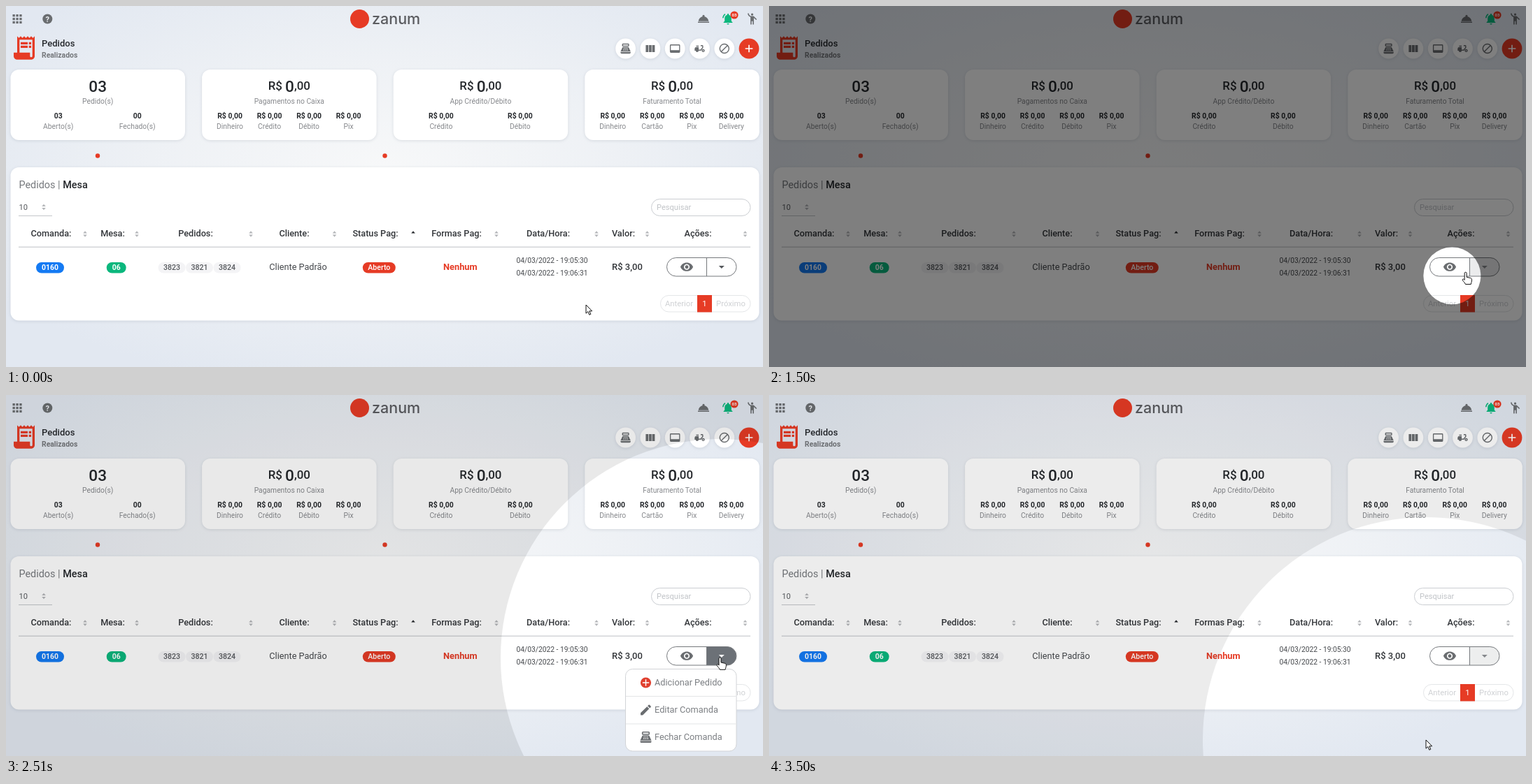
Write an HTML page that moves like this. It is 1082 px wide and 517 px high and loops after 3570 ms.

```html
<!DOCTYPE html>
<html lang="pt-BR">
<head>
<meta charset="utf-8">
<title>Pedidos</title>
<style>
  html, body { margin: 0; width: 100%; height: 100%; overflow: hidden; background: #e4e9f1; }
  svg { display: block; width: 100%; height: 100%; font-family: Roboto, sans-serif; }
  .card { fill: #fff; filter: drop-shadow(0 1px 2px rgba(60, 70, 90, .14)); }
</style>
</head>
<body>
<svg id="stage" viewBox="0 0 1082 517" xmlns="http://www.w3.org/2000/svg"></svg>
<script>
const RED = '#e63b25', GREEN = '#0bb77d', GRAY = '#6a6d70', SOFT = '#86888c', INK = '#25282c';

const ICONS = {
  receipt: 'M19.5 3.5 18 2l-1.5 1.5L15 2l-1.5 1.5L12 2l-1.5 1.5L9 2 7.5 3.5 6 2v14H3v3c0 1.7 1.3 3 3 3h12c1.7 0 3-1.3 3-3V2zM19 19c0 1.3-2 1.3-2 0v-3H8V5h11zM9 7h6v2H9zM16 7h2v2h-2zM9 10h6v2H9zM16 10h2v2h-2z',
  cloche: 'M2 17h20v2H2zM13.8 7.8a2 2 0 1 0-3.6 0C6.3 8.6 3.3 11.9 3 16h18c-.3-4.1-3.3-7.4-7.2-8.2z',
  bell: 'M7.6 4.1 6.2 2.7C3.8 4.5 2.2 7.3 2 10.5h2c.2-2.6 1.5-5 3.6-6.4zM20 10.5h2c-.2-3.2-1.7-6-4.1-7.8l-1.5 1.4c2.1 1.4 3.4 3.8 3.6 6.4zM18 11c0-3.1-1.6-5.6-4.5-6.3V4a1.5 1.5 0 0 0-3 0v.7C7.6 5.4 6 7.9 6 11v5l-2 2v1h16v-1l-2-2zM12 22a2 2 0 0 0 2-2h-4a2 2 0 0 0 2 2z',
  person: 'M12 2a2 2 0 1 0 .01 0zM15.9 8.1C15.5 7.7 14.8 7 13.5 7H11C8.2 7 6 4.8 6 2H4c0 3.2 2.1 5.8 5 6.7V22h2v-6h2v6h2V10l4 4 1.4-1.4z',
  register: 'M7 2h10a2 2 0 0 1 2 2v2a2 2 0 0 1-2 2H7a2 2 0 0 1-2-2V4a2 2 0 0 1 2-2zM7 4v2h10V4zM7.3 9h9.4a2 2 0 0 1 1.8 1.2L22 18H2l3.500-7.800A2 2 0 0 1 7.300 9zM2 19h20v1a2 2 0 0 1-2 2H4a2 2 0 0 1-2-2zM8 11h2v1.200H8zM11 11h2v1.200h-2zM14 11h2v1.200h-2zM7.500 14h2.200v1.300H7.500zM11 14h2v1.300h-2zM14.300 14h2.200v1.300h-2.200z',
  columns: 'M3 5h5.300v14H3zM9.400 5h5.200v14H9.400zM15.700 5H21v14h-5.300z',
  tray: 'M3 3h18a2 2 0 0 1 2 2v14a2 2 0 0 1-2 2H3a2 2 0 0 1-2-2V5a2 2 0 0 1 2-2zM3 5v10.500h18V5z',
  moped: 'M19 7a2 2 0 0 0-2-2h-3v2h3v2.600L13.500 14H10V9H6a4 4 0 0 0-4 4v3h2a3 3 0 0 0 6 0h4.500l4.500-5.600zM5 6h5v2H5zM19 13a3 3 0 1 0 .01 0zM19 15a1 1 0 1 1-.01 0z',
  block: 'M12 2a10 10 0 1 0 .01 0zM12 4a8 8 0 0 1 4.900 1.700L5.700 16.900A8 8 0 0 1 12 4zM12 20a8 8 0 0 1-4.900-1.700L18.300 7.100A8 8 0 0 1 12 20z',
  plus: 'M11 5.500h2V11h5.500v2H13v5.500h-2V13H5.500v-2H11z',
  eye: 'M12 4.500C7 4.500 2.700 7.600 1 12c1.700 4.400 6 7.500 11 7.500s9.300-3.100 11-7.500c-1.700-4.400-6-7.500-11-7.500zM12 7a5 5 0 1 1-.01 0zM12 9a3 3 0 1 0 .01 0z',
  pencil: 'M3 17.200V21h3.800L17.800 9.900l-3.700-3.700zM20.700 7a1 1 0 0 0 0-1.400l-2.300-2.300a1 1 0 0 0-1.400 0l-1.900 1.800 3.800 3.800z'
};

const text = (x, y, s, size, fill = INK, weight = 400, anchor = 'middle') =>
  `<text x="${x}" y="${y}" font-size="${size}" fill="${fill}" font-weight="${weight}" text-anchor="${anchor}">${s}</text>`;
const rect = (x, y, w, h, r, attrs) =>
  `<rect x="${x}" y="${y}" width="${w}" height="${h}" rx="${r}" ${attrs}/>`;
const dot = (x, y, r, fill) => `<circle cx="${x}" cy="${y}" r="${r}" fill="${fill}"/>`;
const line = (x1, x2, y, color, w = 1) => `<path d="M${x1} ${y}H${x2}" stroke="${color}" stroke-width="${w}"/>`;
const icon = (name, x, y, scale, fill = GRAY) =>
  `<path d="${ICONS[name]}" fill="${fill}" fill-rule="evenodd" transform="translate(${x} ${y}) scale(${scale}) translate(-12 -12)"/>`;
const sorter = (x, y, active) =>
  `<path d="M${x - 2.8} ${y - 1}l2.800-3.300 2.800 3.300z" fill="${active ? INK : '#b4b6b9'}"/>` +
  (active ? '' : `<path d="M${x - 2.8} ${y + 1}l2.800 3.300 2.800-3.300z" fill="#b4b6b9"/>`);
const badge = (x, w, s, fill, color = '#fff', size = 10.4, weight = 700) =>
  rect(x - w / 2, 367, w, 15.5, 7.7, `fill="${fill}"`) + text(x, 378.4, s, size, color, weight);

function topBar() {
  let out = '';
  for (let i = 0; i < 9; i++)
    out += rect(9.5 + i % 3 * 4.9, 12 + Math.floor(i / 3) * 4.9, 3.3, 3.3, 0, `fill="${GRAY}"`);
  out += dot(59.3, 18.5, 7, GRAY) + text(59.3, 22.6, '?', 11, '#eef1f5', 700);
  out += dot(505.5, 18.5, 13.5, RED);
  out += `<text x="523" y="26" font-size="21.5" font-weight="500" fill="#5b5c60" style="font-family:Inter,sans-serif">zanum</text>`;
  out += icon('cloche', 997, 18.5, .8) + icon('bell', 1032, 18.5, .8, GREEN) + icon('person', 1066.5, 18.5, .8);
  out += dot(1041, 13, 5.6, RED) + text(1041, 15.2, '03', 6, '#fff', 700);
  out += icon('receipt', 26, 60, 1.667, RED);
  out += text(51, 57.5, 'Pedidos', 13, INK, 500, 'start') + text(51, 73.5, 'Realizados', 10.4, '#74777b', 700, 'start');
  ['register', 'columns', 'tray', 'moped', 'block'].forEach((name, i) => {
    const x = 885.6 + i * 35.3;
    out += `<circle class="card" cx="${x}" cy="61" r="14.4"/>` + icon(name, x, 61, name === 'tray' ? .66 : .72);
  });
  return out + dot(1062, 61, 14.4, RED) + icon('plus', 1062, 61, .82, '#fff');
}

function summary() {
  const money = 'R$ 0,00';
  const cards = [
    ['Pedido(s)', ['Aberto(s)', 'Fechado(s)'], ['03', '00']],
    ['Pagamentos no Caixa', ['Dinheiro', 'Crédito', 'Débito', 'Pix']],
    ['App Crédito/Débito', ['Crédito', 'Débito']],
    ['Faturamento Total', ['Dinheiro', 'Cartão', 'Pix', 'Delivery']]
  ];
  return cards.map(([title, labels, counts], i) => {
    const x = 6.5 + i * 273.6, mid = x + 124.7, step = 226 / labels.length;
    const head = counts ? text(mid, 123, '03', 22.6, INK, 500)
      : text(mid, 119.8, 'R$ <tspan font-size="22.6" dy="3">0</tspan><tspan dy="-3">,00</tspan>', 16.9, INK, 500);
    return rect(x, 91, 249.5, 101, 12, 'class="card"') + head + text(mid, 140, title, 10.3, SOFT) +
      labels.map((label, k) => {
        const cx = mid + (k - (labels.length - 1) / 2) * step;
        return text(cx, 161, counts ? counts[k] : money, 10.4, INK, 700) + text(cx, 176, label, 10.3, SOFT);
      }).join('');
  }).join('') + dot(131, 214.5, 3.2, RED) + dot(541.5, 214.5, 3.2, RED);
}

function table() {
  const columns = [
    ['Comanda:', 64.5, 113], ['Mesa:', 152.5, 187], ['Pedidos:', 271, 350], ['Cliente:', 412, 469.5],
    ['Status Pag:', 528, 582], ['Formas Pag:', 644, 701], ['Data/Hora:', 775, 844], ['Valor:', 882.5, 916.5], ['Ações:', 989, 1056.5]
  ];
  let out = rect(6.5, 231, 1070, 219.5, 12, 'class="card"');
  out += text(18.5, 261, `Pedidos | <tspan fill="${INK}" font-weight="500">Mesa</tspan>`, 14.4, '#75787c', 400, 'start');
  out += text(18.5, 292, '10', 11.1, '#55585c', 400, 'start') + sorter(54, 288) + line(18, 66, 300.5, '#c4c7ca');
  out += rect(922.5, 276.5, 141.5, 24, 12, 'fill="#fff" stroke="#cbced2"') + text(930, 292, 'Pesquisar', 11.1, '#c0c3c7', 400, 'start');
  for (const [name, x, sx] of columns)
    out += text(x, 329.6, name, 12.7, '#33363a', 500) + sorter(sx, 326.5, name === 'Status Pag:');
  out += line(18, 1064, 345.3, '#d3d5d8', 1.5);
  out += badge(63, 40, '0160', '#147af3') + badge(157.7, 28, '06', GREEN) + badge(533.3, 47, 'Aberto', RED, '#fff', 10.6, 500);
  [237, 276.5, 316].forEach((x, i) => out += badge(x, 39, [3823, 3821, 3824][i], '#f4f4f6', '#55585c', 10.6, 500));
  out += text(417.5, 378, 'Cliente Padrão', 12.7, '#45484c') + text(649.3, 378, 'Nenhum', 12.8, RED, 700);
  out += text(780.5, 367.7, '04/03/2022 - 19:05:30', 10.25, '#45484c') + text(780.5, 386, '04/03/2022 - 19:06:31', 10.25, '#45484c');
  out += text(888, 378, 'R$ 3,00', 13, '#33363a', 500);
  out += '<path id="toggle" d="M1001.500 360.500h29a13.200 13.200 0 0 1 0 26.500h-29z" fill="#6c7177"/>';
  out += rect(944.5, 360.5, 99.5, 26.5, 13.2, 'fill="none" stroke="#75787c"') + '<path d="M1001.500 360.500v26.500" stroke="#75787c"/>';
  out += icon('eye', 973, 373.7, .82) + '<path id="caret" d="M1018.800 372h8l-4 4z"/>';
  out += rect(935.5, 414.5, 128.5, 23.5, 11.7, 'fill="#fff" stroke="#e4e6e8"') + rect(988, 414, 21, 24.5, 0, `fill="${RED}"`);
  return out + text(962, 430, 'Anterior', 11.3, '#cfd1d4') + text(998.5, 430, '1', 11.3, '#fff') + text(1036, 430, 'Próximo', 11.3, '#cfd1d4');
}

function menu() {
  let out = rect(885.5, 392.5, 158.5, 117.5, 10, 'fill="#fff" stroke="#d2d4d7"');
  out += line(886, 1043.5, 431.5, '#e3e5e7') + line(886, 1043.5, 471, '#e3e5e7');
  ['Adicionar Pedido', 'Editar Comanda', 'Fechar Comanda'].forEach((s, i) =>
    out += text(927, 415.5 + i * 39.2, s, 12.75, '#7c7f83', 400, 'start'));
  out += dot(914.5, 412, 7.6, '#e0402f') + icon('plus', 914.5, 412, .72, '#fff');
  return out + icon('pencil', 914.5, 451, .83) + icon('register', 914.5, 490, .8);
}

const stage = document.getElementById('stage');
stage.innerHTML = `
  <defs><radialGradient id="sky" cx=".5" cy=".45" r=".62">
    <stop stop-color="#f7f8f9"/><stop offset=".5" stop-color="#eef1f5"/><stop offset="1" stop-color="#e2e8f1"/>
  </radialGradient></defs>
  ${rect(0, 0, 1082, 517, 0, 'fill="url(#sky)"')}
  ${topBar()}${summary()}${table()}
  <g id="menu">${menu()}</g>
  <path id="shade" fill-rule="evenodd"/>
  <g id="pointer" fill="#fff" stroke="#111" stroke-linejoin="round">
    <path id="arrow" d="M0 0v12.200l2.800-2.600 2 4.700 2-.9-2-4.500h3.900z"/>
    <path id="hand" d="M-1.500 1a1.500 1.500 0 0 1 3 0v5.500l5.500 1.300c1.500.4 1.900 1.200 1.900 2.600 0 2.800-.9 3.800-1.300 6.400H-.2c-.7-2.200-2.600-3.600-4-5.700-.9-1.500.9-2.500 2-1.300l.7.800z"/>
  </g>`;
const el = id => document.getElementById(id);

const LOOP = 3570, ZOOM = 540, LAG = 40;
const SPOTS = [[649, 1579], [2451, 3279]];           // spotlight opens, closes
const PATH = [                                       // time, pointer x, y
  [1180, 829, 428], [1310, 890, 409], [1420, 985, 384], [1520, 1020.5, 376.5], [2770, 1020.5, 376.5],
  [2866, 1010, 412], [2940, 972.5, 456.5], [3000, 951, 480], [3090, 941, 491], [3130, 939, 494]
];
const RUNS = [[0, 0, 1], [690, 800, 2], [860, 920, 2], [1020, 1160, 3], [1240, 1730, 8], [1800, 2120, 6],
  [2510, 2570, 2], [2644, 2940, 5], [3000, 3000, 1], [3090, 3140, 2], [3280, 3500, 4]];
const TICKS = RUNS.flatMap(([a, b, n]) => Array.from({ length: n }, (_, i) => a + (n > 1 ? (b - a) * i / (n - 1) : 0)));

const clamp = v => Math.min(1, Math.max(0, v));
const bezier = (s, a, b) => 3 * (1 - s) ** 2 * s * a + 3 * (1 - s) * s * s * b + s ** 3;

// cubic-bezier(.41, .52, 0, .94)
function ease(x) {
  if (x <= 0 || x >= 1) return clamp(x);
  let lo = 0, hi = 1;
  for (let i = 0; i < 24; i++) {
    const mid = (lo + hi) / 2;
    if (bezier(mid, .41, 0) < x) lo = mid; else hi = mid;
  }
  return bezier(lo, .52, .94);
}

function pointerAt(t) {
  const i = PATH.findIndex(p => p[0] > t);
  if (i < 1) return (i ? PATH[PATH.length - 1] : PATH[0]).slice(1);
  const [a, b] = [PATH[i - 1], PATH[i]], k = (t - a[0]) / (b[0] - a[0]);
  return [a[1] + (b[1] - a[1]) * k, a[2] + (b[2] - a[2]) * k];
}

function spotAt(t) {
  const [open, close] = SPOTS[t < 2300 ? 0 : 1];
  return t < close ? ease((t - open) / ZOOM) : 1 - ease((t - close) / ZOOM);
}

function draw(t) {
  const [x, y] = pointerAt(t), [cx, cy] = pointerAt(t - LAG), zoom = spotAt(t);
  const r = 369 - 328 * zoom;
  el('shade').setAttribute('d', `M0 0H1082V517H0zM${cx - r} ${cy}a${r} ${r} 0 1 0 ${2 * r} 0a${r} ${r} 0 1 0 ${-2 * r} 0z`);
  el('shade').setAttribute('fill-opacity', zoom / 2);

  const hover = clamp((t - 1430) / 150) * clamp(1 - (t - 3280) / 250);
  el('toggle').setAttribute('fill-opacity', hover);
  el('caret').setAttribute('fill', hover > .5 ? '#fff' : hover > 0 ? '#85888c' : '#55585c');
  el('menu').style.display = t >= 1640 && t < 3280 ? '' : 'none';

  const hand = x > 944 && t < 3280 || t > 2900 && t < 3280;
  el('arrow').style.display = hand ? 'none' : '';
  el('hand').style.display = hand ? '' : 'none';
  el('pointer').setAttribute('transform', `translate(${x} ${y})`);
}

const start = performance.now();
function tick() {
  const t = (performance.now() - start) % LOOP;
  draw(TICKS.filter(s => s <= t + .5).pop());
  requestAnimationFrame(tick);
}
tick();
</script>
</body>
</html>
```
